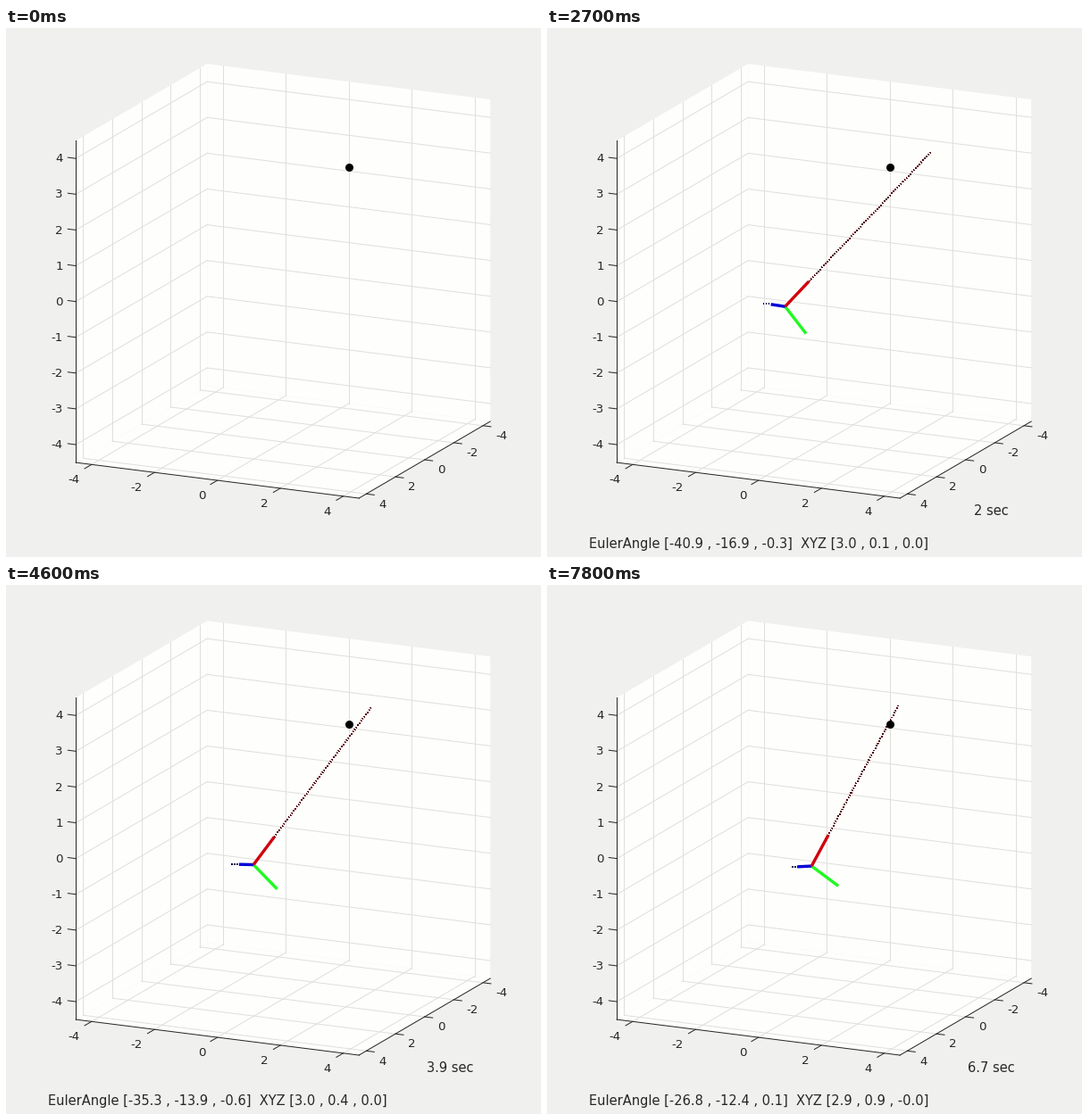
Animation of 599 by 593 pixels, one loop 8 s. Source, as a matplotlib script:

```python
import numpy as np
import matplotlib.pyplot as plt
from matplotlib.animation import FuncAnimation

W, H, DPI = 599, 593, 100
PT = 72 / DPI  # points per pixel
STEP_MS, FRAMES = 100, 80
LIM = 4.5
LAG = 0.1  # the readout trails the drawn pose by one step

# Screen vectors of the unit axes and of the scene centre
CENTER = np.array([310.2, 283.6])
AXES = np.array([[-16.33, 9.56], [35.22, 4.44], [0, -40.1]])
GOAL = (2, 3, 4)

# The clock runs unevenly and skips a step now and then
START_MS, TEXT_MS = 700, 900
HOLDS = {8, 13, 24, 31, 35, 40, 44, 47, 54, 57, 64, 67, 73, 79}
CLOCK_MS = [700, 1200, 2100, 4600, 4800, 7800]
CLOCK_S = [0, 0.4, 1.4, 3.9, 4.0, 6.7]

# Key poses in degrees: roll, pitch, yaw
KEY_T = np.array([0.3, 1.3, 2.6, 3.8, 4.8, 6.6])
KEYS = np.array([[-21.3, -8.2, 1.2], [-40.3, -16.8, 1.0], [-39.7, -15.8, -1.6],
                 [-35.3, -13.9, -0.6], [-31.7, -13.4, -0.03], [-26.8, -12.4, 0.1]])


def project(p):
    return CENTER + np.asarray(p, float) @ AXES


def rise(t):
    return 1 - np.exp(-t / 0.53)


AIM = KEYS / rise(KEY_T)[:, None]
SLOPE = np.gradient(AIM, KEY_T, axis=0)


def angles(t):
    """Ease into the aim, which follows a cubic Hermite curve."""
    i = int(np.clip(np.searchsorted(KEY_T, t) - 1, 0, len(KEY_T) - 2))
    h = KEY_T[i + 1] - KEY_T[i]
    s = (t - KEY_T[i]) / h
    aim = ((1 + 2 * s) * (1 - s) ** 2 * AIM[i] + s * (1 - s) ** 2 * h * SLOPE[i]
           + s * s * (3 - 2 * s) * AIM[i + 1] + s * s * (s - 1) * h * SLOPE[i + 1])
    return rise(t) * aim


def position(t):
    """Speed up along a circle of radius 3."""
    y = 0.184 * (t - 1.7 * (1 - np.exp(-t / 1.7)))
    return np.array([np.sqrt(9 - y * y), y, 0.004 * (6.3 - t)])


def rotation(roll, pitch, yaw):
    cr, cp, cy = np.cos(np.radians([roll, pitch, yaw]))
    sr, sp, sy = np.sin(np.radians([roll, pitch, yaw]))
    rx = np.array([[1, 0, 0], [0, cr, -sr], [0, sr, cr]])
    ry = np.array([[cp, 0, sp], [0, 1, 0], [-sp, 0, cp]])
    rz = np.array([[cy, -sy, 0], [sy, cy, 0], [0, 0, 1]])
    return rz @ ry @ rx


fig = plt.figure(figsize=(W / DPI, H / DPI), dpi=DPI, facecolor="#f0f0ef")
ax = fig.add_axes([0, 0, 1, 1])
ax.set_xlim(0, W)
ax.set_ylim(H, 0)
ax.axis("off")


def path(points, color):
    """Draw each segment alone, so that upright ones stay crisp."""
    pts = [project(p) for p in points]
    for a, b in zip(pts, pts[1:]):
        ax.plot(*np.transpose([a, b]), color=color, lw=PT)


def pane(points):
    ax.fill(*np.transpose([project(p) for p in points]), color="#fefefd", lw=0)


def label(x, y, text, ha, size=13.33):
    return ax.text(x, y, text, ha=ha, va="baseline", fontsize=size * PT,
                   color="#262626", family="DejaVu Sans")


def tick(point, outward, dx, dy, value, ha):
    x, y = project(point)
    step = 9 * outward / np.hypot(*outward)
    ax.plot([x, x + step[0]], [y, y + step[1]], color="#262626", lw=PT)
    label(x + dx, y + dy + 4.9, str(value), ha)


def draw_box():
    a = LIM
    pane([(-a, -a, -a), (a, -a, -a), (a, a, -a), (-a, a, -a)])
    pane([(-a, -a, -a), (a, -a, -a), (a, -a, a), (-a, -a, a)])
    pane([(-a, -a, -a), (-a, a, -a), (-a, a, a), (-a, -a, a)])
    grid = "#dfdfde"
    for k in range(-4, 5, 2):
        path([(k, a, -a), (k, -a, -a), (k, -a, a)], grid)
        path([(a, k, -a), (-a, k, -a), (-a, k, a)], grid)
        tick((a, k, -a), AXES[0], -13.5, 16, k, "right")
        tick((k, a, -a), AXES[1], 14.4, 10.4, k, "left")
    for k in range(-4, 5):
        path([(a, -a, k), (-a, -a, k), (-a, a, k)], grid)
        tick((a, -a, k), -AXES[1], -14.6, -0.8, k, "right")
    path([(a, -a, a), (a, -a, -a), (a, a, -a), (-a, a, -a)], "#262626")


def moving(color, width, zorder, **kw):
    return ax.plot([], [], color=color, lw=width * PT, zorder=zorder, **kw)[0]


draw_box()
dotted = dict(ls=(0, (1, 2.2)), antialiased=False)
far_z = moving("#500008", 1, 4, **dotted)
far_x = moving("#000050", 1, 4, **dotted)
arms = [moving(c, 3.4, z, solid_capstyle="butt")
        for c, z in (("#0000d8", 6), ("#20fa20", 5), ("#d0000c", 7))]
ax.plot(*project(GOAL)[:, None] + 0.5, "o", color="black", ms=9 * PT, mew=0,
        zorder=8)
clock = label(497.5, 546.5, "", "center", 14.58)
readout = label(237, 583.5, "", "center", 14.58)


def segment(line, start, end):
    line.set_data(*np.transpose([project(start), project(end)]))


def update(i):
    ms = STEP_MS * (i - (i in HOLDS))
    shown = ms >= START_MS
    for line in [far_z, far_x, *arms]:
        line.set_visible(shown)
    for text in (clock, readout):
        text.set_visible(ms >= TEXT_MS)
    if not shown:
        return []

    t = np.interp(ms, CLOCK_MS, CLOCK_S)
    origin, body = position(t), rotation(*angles(t)).T
    for line, axis in zip(arms, body):
        segment(line, origin, origin + axis)
    segment(far_x, origin, origin + 1.5 * body[0])
    # The long ray ends at the top of the box
    segment(far_z, origin, origin + body[2] * (LIM - origin[2]) / body[2][2])

    past = max(t - LAG, 0)
    join = lambda vals: " , ".join(f"{v:.1f}" for v in vals)
    clock.set_text(f"{round(t, 1):g} sec")
    readout.set_text(f"EulerAngle [{join(angles(past))}]  XYZ [{join(position(past))}]")
    return []


anim = FuncAnimation(fig, update, frames=FRAMES, interval=STEP_MS,
                     init_func=lambda: update(0), repeat=True,
                     repeat_delay=0, blit=False)
plt.show()
```
